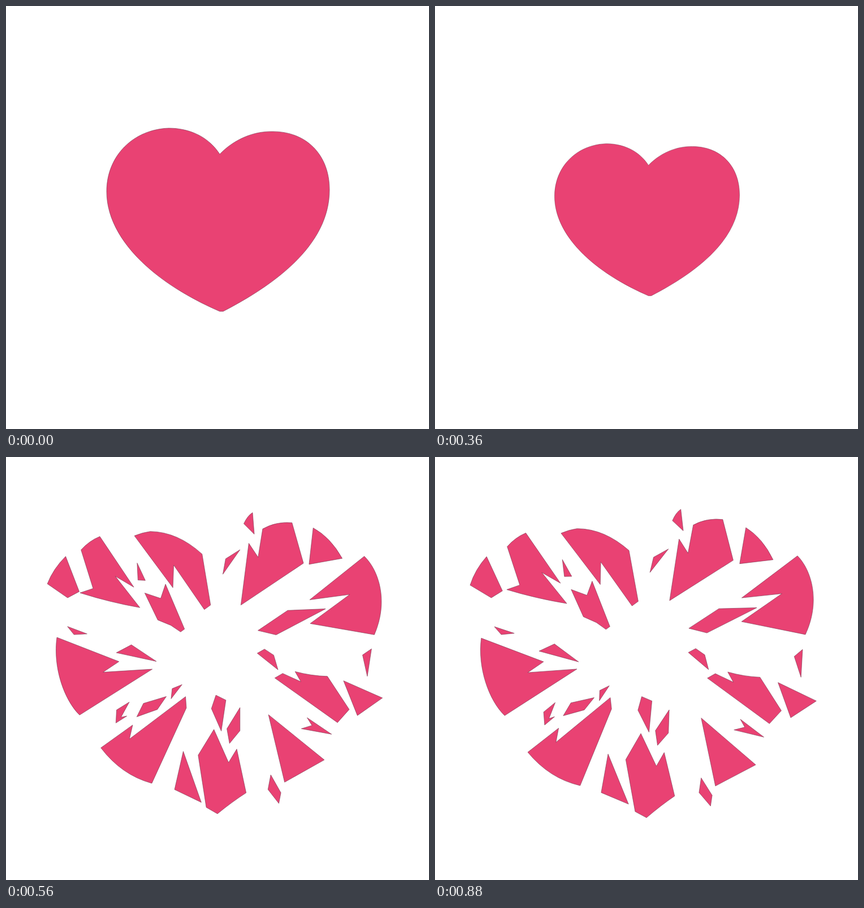
Animation of 748 by 748 pixels, one loop 1.12 s. Source, as an HTML page:

```html
<!DOCTYPE html>
<html lang="en">
<head>
<meta charset="utf-8">
<title>Bursting heart</title>
<style>
  html, body { margin: 0; width: 100%; height: 100%; overflow: hidden; background: #fff; }
  svg { display: block; width: 100%; height: 100%; }
  path { fill: #e94273; stroke: #74304a; stroke-width: .6; }
  #cracks { fill: #fff; }
</style>
</head>
<body>
<svg viewBox="0 0 748 748">
  <path id="heart" d="M378 262C358 231 324 216 288 216C226 218 178 264 178 328C178 410 258 488 378 540L384 540C500 480 572 410 572 325C572 262 530 222 472 222C434 221 400 239 378 262Z"/>

  <g id="cracked">
    <path d="M386 325L373 248Q340 214 274 214L283 235 259 202 254 199Q208 214 176 254L180 262 270 322 161 303Q154 368 202 427L215 422 201 436Q234 486 296 516L308 500 303 515 378 554 384 553 450 517 457 524Q502 506 538 452L533 450Q558 424 575 387L540 369 584 364C597 316 590 256 540 223L507 249 538 206Q521 182 470 182C424 183 400 202 397 230Z"/>
    <path id="cracks" d="M297 336L338 352 331 335 379 366 375 327 386 368 393 370 427 336 413 330 472 274 426 325 446 327 395 370 415 366 438 392 408 382 419 427 422 414 445 461 446 491 420 428 388 390 340 441 365 374 328 377 256 419 278 401 268 393 337 370Z"/>
  </g>

  <!-- data-from: where the first edge of each shard starts out -->
  <g id="shards">
    <path d="M95 176L122 237 102 249 65 226Q74 199 95 176Z" data-from="137 175 152 241"/>
    <path d="M162 136L223 225 190 206 234 261Q180 252 128 236L151 228 129 160Q143 144 162 136Z" data-from="177 153 236 247"/>
    <path d="M344 167L360 257 349 265 294 187 293 227 224 136Q238 130 252 128Q300 128 344 167Z" data-from="355 186 367 276"/>
    <path d="M227 183L243 213 230 213Z" data-from="247 202 256 233"/>
    <path d="M279 221L311 301 304 306 287 294 264 284 242 236 270 246Z" data-from="291 236 330 314"/>

    <path d="M106 300L141 312 118 314Z" data-from="117 299 150 315"/>
    <path d="M84 320L194 362 166 381 253 375 125 457C97 430 77 372 84 320Z" data-from="108 316 217 361"/>
    <path d="M214 331L257 362 187 344Z" data-from="244 335 293 360"/>
    <path d="M193 450L214 434 202 462 212 459 194 473Z" data-from="204 439 229 432"/>
    <path d="M241 435L282 425 265 447 228 458Z" data-from="249 438 288 419"/>
    <path d="M309 404L291 430 292 412Z" data-from="318 398 295 420"/>

    <path d="M215 503L312 425 314 445 257 580Q203 567 165 520L220 478Z" data-from="228 486 334 420"/>
    <path d="M308 524L343 613 295 592Z" data-from="330 511 352 603"/>
    <path d="M365 487L392 545 406 521 424 598Q400 614 374 636L354 625 338 533Z" data-from="376 467 398 525"/>
    <path d="M385 431L379 486 360 447 367 423Z" data-from="400 428 386 479"/>
    <path d="M414 446L413 487 394 509 390 483Z" data-from="413 434 416 475"/>
    <path d="M469 460L566 542 495 580Z" data-from="450 443 553 516"/>
    <path d="M470 566L489 597 486 616 466 592Z" data-from="463 551 477 583"/>

    <path d="M573 389L611 448 590 471 480 391 494 383 526 398 516 380Q545 388 573 389Z" data-from="554 384 595 442"/>
    <path d="M604 398L672 430 627 460Z" data-from="576 389 646 414"/>
    <path d="M447 346L483 376 476 350 460 339Z" data-from="436 350 475 377"/>
    <path d="M649 340L645 389 634 352Z" data-from="638 338 621 383"/>
    <path d="M538 463L580 494 527 482 546 477Z" data-from="516 455 563 479"/>

    <path d="M501 269L568 267 480 312 448 304Z" data-from="490 278 556 273"/>
    <path d="M654 314L541 292 612 242 541 250 639 175C664 200 681 255 654 314Z" data-from="643 315 529 302"/>
    <path d="M597 181L538 189 548 125Q578 143 597 181Z" data-from="587 174 530 192"/>
    <path d="M508 112L527 184 415 256 431 147 447 172 456 122Q480 109 508 112Z" data-from="499 129 523 199"/>
    <path d="M413 163L381 205 387 178Z" data-from="416 167 391 214"/>
    <path d="M435 94L439 132 420 114Q426 100 435 94Z" data-from="439 111 439 150"/>
  </g>
</svg>
<script>
  const LOOP = 1120;

  // Each pose holds until the next one starts.
  const poses = [
    { at: 0, scale: 1 },
    { at: 320, scale: 0.869 },
    { at: 360, scale: 0.83 },
    { at: 440, cracked: true },
    { at: 480, spread: 0 },
    { at: 560, spread: 0.75 },
    { at: 680, spread: 1 },
    { at: 880, spread: 1.09 }
  ];

  const byId = id => document.getElementById(id);
  const heart = byId('heart'), cracked = byId('cracked'), group = byId('shards');

  function edge(text) {
    const [x1, y1, x2, y2] = text.match(/\d+/g).map(Number);
    const angle = Math.atan2(y2 - y1, x2 - x1) * 180 / Math.PI;
    return { x: (x1 + x2) / 2, y: (y1 + y2) / 2, angle };
  }

  const shards = [...group.children].map(path => {
    const end = edge(path.getAttribute('d'));
    const start = edge(path.dataset.from);
    const turn = (start.angle - end.angle + 540) % 360 - 180;
    return { path, end, dx: start.x - end.x, dy: start.y - end.y, turn };
  });

  function show(element, visible) {
    element.setAttribute('visibility', visible ? 'visible' : 'hidden');
  }

  function placeShards(spread) {
    const k = 1 - spread;
    for (const { path, end, dx, dy, turn } of shards) {
      path.setAttribute('transform',
        `translate(${dx * k} ${dy * k}) rotate(${turn * k} ${end.x} ${end.y})`);
    }
  }

  function render(time) {
    const t = time % LOOP;
    const pose = poses.findLast(p => p.at <= t);
    const whole = pose.scale !== undefined;
    const burst = pose.spread !== undefined;
    show(heart, whole);
    show(cracked, pose.cracked);
    show(group, burst);
    if (whole) {
      heart.setAttribute('transform',
        `translate(375 377.6) scale(${pose.scale}) translate(-375 -377.6)`);
    }
    if (burst) placeShards(pose.spread);
  }

  const begin = performance.now();
  function tick() {
    render(performance.now() - begin);
    requestAnimationFrame(tick);
  }
  tick();
</script>
</body>
</html>
```
